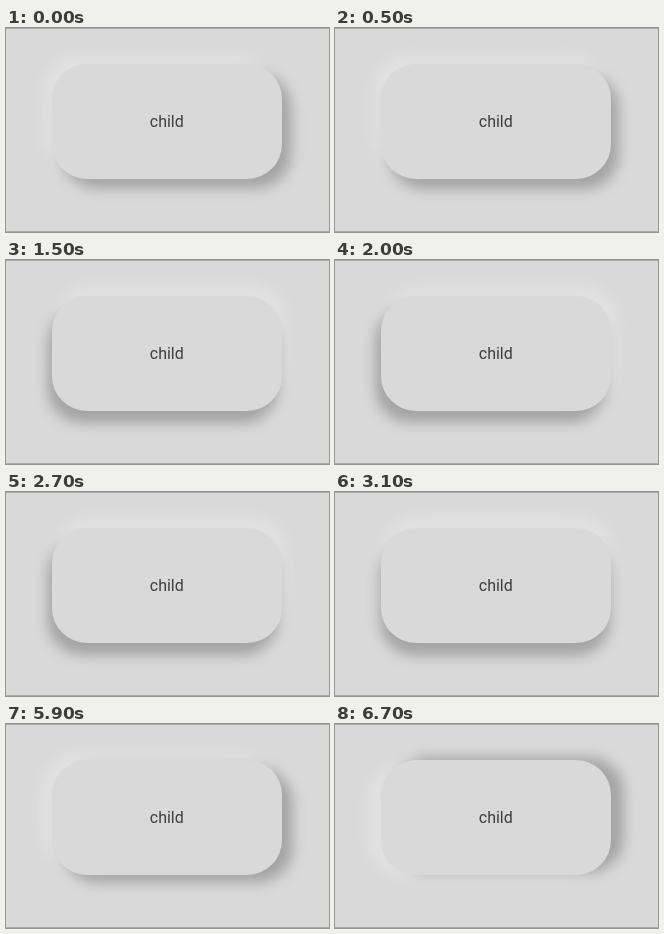
These frames come from a looping animation (323 px wide and 204 px high, 8 s). An HTML page:

```html
<!DOCTYPE html>
<html>
<head>
<meta charset="utf-8">
<style>
html, body { margin: 0; height: 100%; overflow: hidden; }
body { position: relative; background: #d9d9d9; }
body::before, body::after {
  content: ""; position: absolute; left: 0; right: 0; height: 1px; background: #aaa;
}
body::before { top: 0; }
body::after { top: 203px; }
#card {
  position: absolute; left: 46px; top: 36px; width: 229.5px; height: 114.5px;
  border-radius: 35px; background: #d9d9d9; color: #3e3e3e;
  font: 16px/116px Roboto, sans-serif; text-align: center;
}
</style>
</head>
<body>
<div id="card">child</div>
<script>
const LOOP = 8000, STEP = 400, LEAD = 100;
const DISTANCE = 13, BLUR = 13;
const card = document.getElementById("card");

// Smooth progress from 0 to 1 between two times.
function ease(time, start, end) {
  const u = Math.min(1, Math.max(0, (time - start) / (end - start)));
  return u * u * (3 - 2 * u);
}

// Direction of the dark shadow in degrees, clockwise from the right.
function direction(time) {
  return 45 + 72 * ease(time, -100, 1900)
    - 65 * ease(time, 2300, 4300)
    - 64 * ease(time, 5500, 6700);
}

function draw() {
  const time = performance.now() % LOOP;
  const held = Math.floor((time + LEAD) / STEP) * STEP - LEAD;
  const angle = direction(held) * Math.PI / 180;
  const x = DISTANCE * Math.cos(angle), y = DISTANCE * Math.sin(angle);
  const shadow = (side, color) => `${side * x}px ${side * y}px ${BLUR}px ${color}`;
  card.style.boxShadow = `${shadow(1, "#a4a4a4")}, ${shadow(-1, "#e1e1e1")}`;
  requestAnimationFrame(draw);
}
draw();
</script>
</body>
</html>
```
